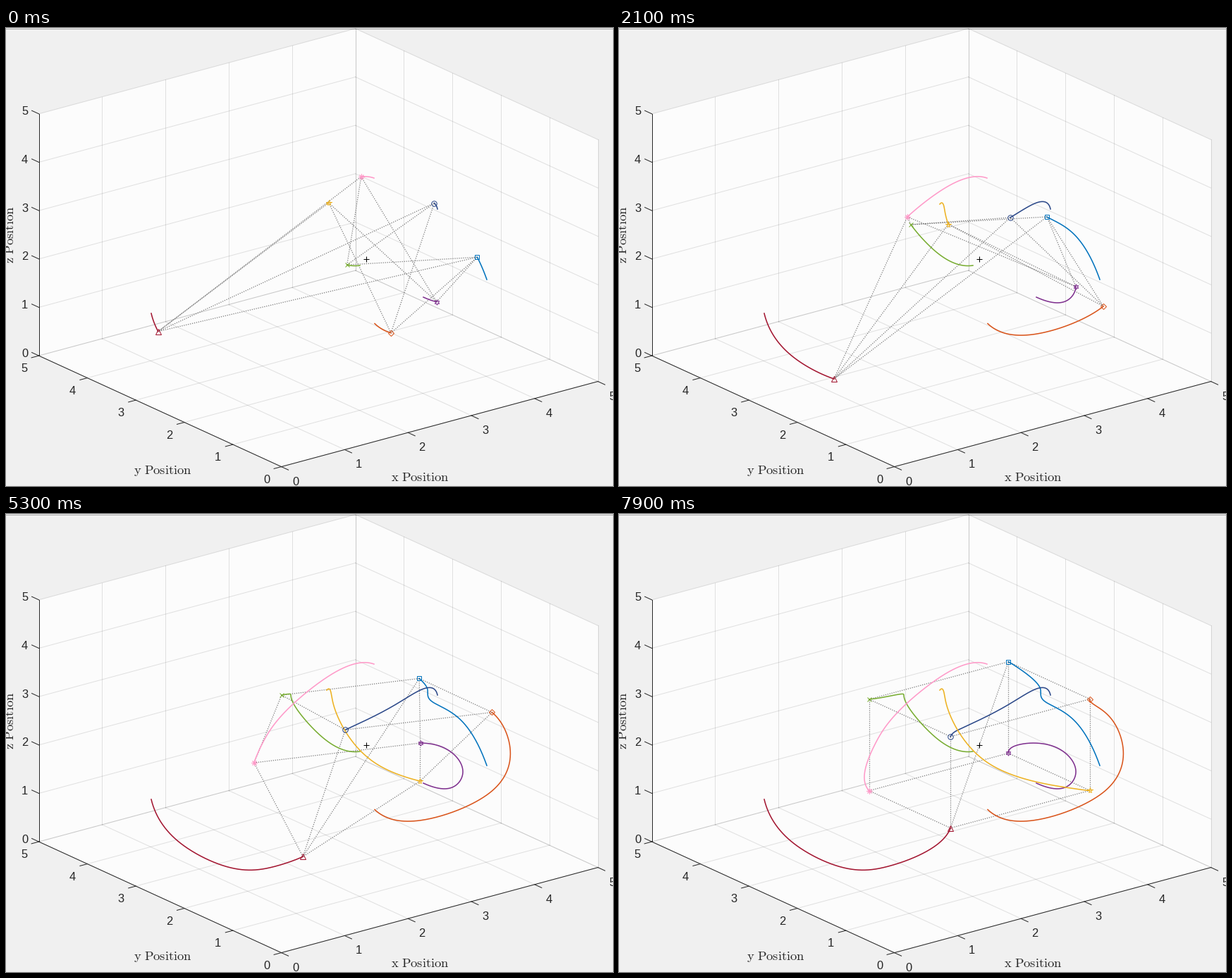
Write a matplotlib script that moves like this. It is 861x650 px and loops after 8000 ms.

```python
import numpy as np
import matplotlib
import matplotlib.pyplot as plt
from matplotlib.animation import FuncAnimation

matplotlib.rcParams["mathtext.fontset"] = "cm"

W, H, DPI = 861, 650, 64
PX = 72 / DPI  # points per pixel
FRAMES, INTERVAL = 80, 100
HELD_FRAME = 60  # repeats the picture before it
DARK = "#262626"

# Stage position of the box origin and of one unit along each axis.
ORIGIN = np.array([390.6, 622.6])
AXES = np.array([[89.8, -24.2], [-68.8, -31.5], [0, -68.65]])

fig = plt.figure(figsize=(W / DPI, H / DPI), dpi=DPI, facecolor="#f0f0f0")
ax = fig.add_axes([0, 0, 1, 1])
ax.set_xlim(0, W)
ax.set_ylim(H, 0)
ax.axis("off")


def project(x, y, z):
    return ORIGIN + np.dot((x, y, z), AXES)


def segment(a, b, **style):
    ax.plot([a[0], b[0]], [a[1], b[1]], **style)


def label(pos, text, size, **style):
    ax.text(*pos, text, fontsize=size * PX, color=DARK, ha="center",
            va="baseline", **style)


def draw_box():
    outline = [(0, 0, 0), (5, 0, 0), (5, 0, 5), (5, 5, 5), (0, 5, 5), (0, 5, 0)]
    ax.add_patch(plt.Polygon([project(*p) for p in outline],
                             facecolor="#fcfcfc", edgecolor="none"))
    segment((0, 0.5), (W, 0.5), color="#a8a8a8", lw=PX)

    grid = dict(color=DARK, alpha=0.13, lw=PX)
    for i in range(6):
        for a, b in [((i, 0, 0), (i, 5, 0)), ((0, i, 0), (5, i, 0)),
                     ((i, 5, 0), (i, 5, 5)), ((0, 5, i), (5, 5, i)),
                     ((5, i, 0), (5, i, 5)), ((5, 0, i), (5, 5, i))]:
            segment(project(*a), project(*b), **grid)

    axis = dict(color=DARK, lw=PX)
    segment(project(0, 0, 0), project(5, 0, 0), **axis)
    segment(project(0, 0, 0), project(0, 5, 0), **axis)
    segment(project(0, 5, 0), project(0, 5, 5), **axis)
    for i in range(6):
        for base, tick, offset in [((i, 0, 0), (10, 4.6), (20, 26)),
                                   ((0, i, 0), (-10.5, 2.8), (-21, 23)),
                                   ((0, 5, i), (-10, -4.6), (-20, 1.5))]:
            p = project(*base)
            segment(p, p + tick, **axis)
            label(p + offset, str(i), 16.5, family="Liberation Sans")

    for name, pos, angle in [("x", (587, 643), 0), ("y", (222.5, 633.5), 0),
                             ("z", (11.5, 293.5), 90)]:
        label(pos, rf"$\mathrm{{{name}\ Position}}$", 18.5, rotation=angle,
              rotation_mode="anchor")


CENTRE = np.array([511.3, 327.7])  # the group's centroid never moves
HALF_SIZE = np.array([1.1, 0.84, 0.945])
KNOTS = np.array([-5.5, 9, 21, 41, 63, 78])  # steps of the key points
STEPS = np.arange(KNOTS[0], KNOTS[-1] + 0.01, 0.25)


def spline(points):
    """Cubic spline with parabolic ends through the points, sampled at STEPS."""
    p = np.array(points, float)
    h = np.diff(KNOTS)
    system = (np.diag(2 * (h[:-1] + h[1:])) + np.diag(h[1:-1], 1)
              + np.diag(h[1:-1], -1))
    system[0, 0] += h[0]
    system[-1, -1] += h[-1]
    bend = np.linalg.solve(system, 6 * np.diff(np.diff(p, axis=0) / h[:, None], axis=0))
    bend = np.pad(bend, ((1, 1), (0, 0)), mode="edge")

    i = np.clip(np.searchsorted(KNOTS, STEPS, side="right") - 1, 0, len(h) - 1)
    width = h[i, None]
    b = (STEPS - KNOTS[i])[:, None] / width
    a = 1 - b
    return (a * p[i] + b * p[i + 1]
            + ((a**3 - a) * bend[i] + (b**3 - b) * bend[i + 1]) * width**2 / 6)


class Agent:
    """Travels through a few key points to its corner of the final cuboid."""

    def __init__(self, color, marker, size, corner, *keys):
        goal = CENTRE + np.dot(corner * HALF_SIZE, AXES)
        self.path = spline([*keys, goal])
        self.trail, = ax.plot([], [], color=color, lw=1.55 * PX, zorder=4)
        self.head, = ax.plot([], [], marker=marker, ms=size * PX, mfc="none",
                             mec=color, mew=PX, zorder=5)

    def move(self, step):
        n = int(np.searchsorted(STEPS, step)) + 1
        self.trail.set_data(*self.path[:n].T)
        self.pos = self.path[n - 1]
        self.head.set_data(self.pos[:1], self.pos[1:])


draw_box()
ax.plot(*CENTRE, "+", color="black", ms=8 * PX, mew=PX, zorder=6)

green = Agent("#77ac30", "x", 6, (-1, 1, 1),
              (502, 337), (452, 319.5), (414, 279), (403, 255.5), (375.5, 260))
blue = Agent("#0072bd", "s", 5.2, (1, 1, 1),
             (682, 357), (642, 289.5), (607, 268), (597.5, 247.5), (571.5, 222))
orange = Agent("#d95319", "D", 6.2, (1, -1, 1),
               (523, 419.5), (601, 432.5), (687, 395), (709, 309), (674.5, 271))
navy = Agent("#2a4788", "o", 7.5, (-1, -1, 1),
             (612, 257), (591, 248.5), (555, 269), (498, 298.5), (475, 310))
pink = Agent("#ff99c8", (8, 2, 0), 8, (-1, 1, -1),
             (522, 213), (466, 225), (409, 268), (363.5, 326), (348, 372))
purple = Agent("#7e2f8e", (6, 1, 0), 7.5, (1, 1, -1),
               (592, 382), (634, 387.5), (648, 367), (619.5, 331), (565, 328))
yellow = Agent("#edb120", "*", 8, (1, -1, -1),
               (455, 250), (461, 253.5), (467, 278.5), (523, 353), (637, 388.5))
red = Agent("#a2142f", "^", 7.5, (-1, -1, -1),
            (206, 405), (246, 466), (305, 498), (382, 500), (448, 471.5))

top = [green, blue, orange, navy]
bottom = [pink, purple, yellow, red]
agents = top + bottom
pairs = [(ring[i - 1], ring[i]) for ring in (top, bottom) for i in range(4)]
pairs += [*zip(top, bottom), (blue, red)]
links = [ax.plot([], [], color="#7a7a7a", lw=1.25 * PX, ls=(0, (1, 1.4)),
                 dash_capstyle="butt", zorder=3)[0] for _ in pairs]


def update(frame):
    step = frame if frame < HELD_FRAME else frame - 1
    for agent in agents:
        agent.move(step)
    for link, (a, b) in zip(links, pairs):
        link.set_data(*np.array([a.pos, b.pos]).T)
    return links


anim = FuncAnimation(fig, update, frames=FRAMES, interval=INTERVAL,
                     repeat=True, repeat_delay=0)
plt.show()
```
